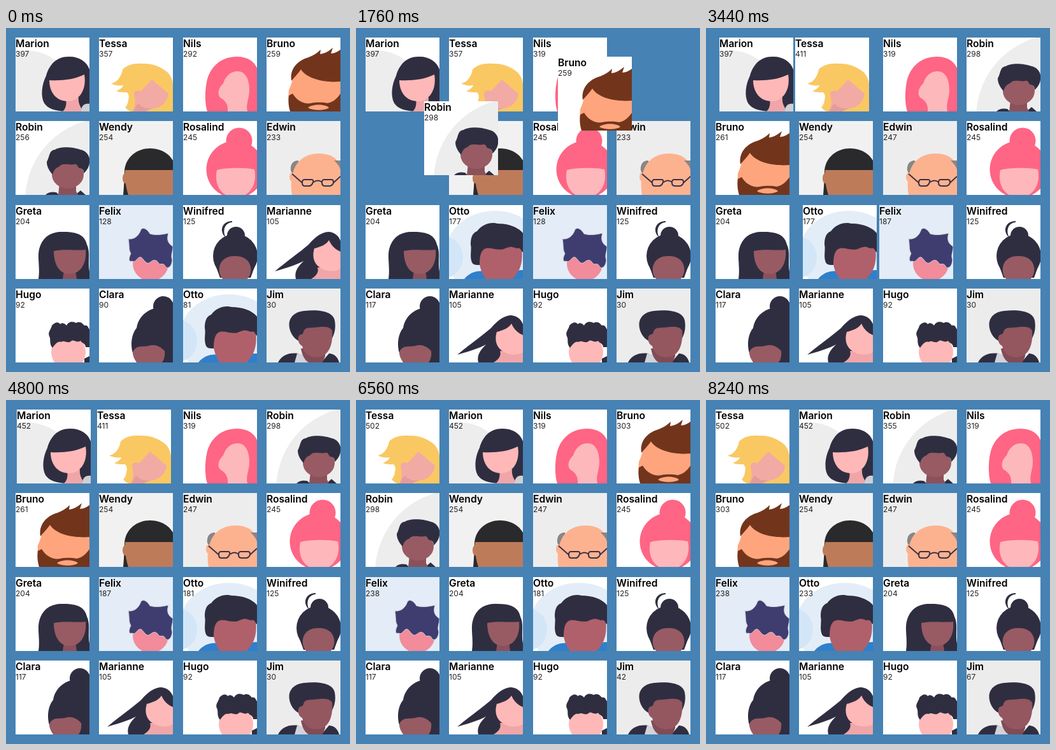
An HTML page that plays this animation: 540x540 px, repeating every 8.32 s.

```html
<!DOCTYPE html>
<html lang="en">
<head>
<meta charset="utf-8">
<title>Leaderboard</title>
<style>
  html, body { margin: 0; width: 100%; height: 100%; overflow: hidden; background: #4682b4; }
  #board { position: absolute; left: 0; top: 0; width: 540px; height: 540px; overflow: hidden; }
  .card { position: absolute; width: 116px; height: 116px; overflow: hidden; background: #fff; }
  .card svg { position: absolute; left: 0; top: 0; }
  .name, .score { position: absolute; left: 0; white-space: nowrap; font-family: Inter, Roboto, sans-serif; }
  .name { top: 0; font-size: 15.6px; line-height: 20px; font-weight: 600; color: #000; }
  .score { top: 19px; font-size: 12px; line-height: 14px; color: #222; }
</style>
</head>
<body>
<div id="board"></div>
<script>
const LOOP = 8320, FRAME = 80, MOVE = 347;
const DARK = '#2f2e41', PINK = '#ff6584', SKIN = '#ffb8b8', BROWN = '#985b63', GREY = '#ededed';

const path = (fill, d, extra = '') => `<path fill="${fill}" d="${d}" ${extra}/>`;
const oval = (fill, x, y, rx, ry = rx) => `<ellipse fill="${fill}" cx="${x}" cy="${y}" rx="${rx}" ry="${ry}"/>`;
const fillAll = fill => path(fill, 'M0 0H116V116H0Z');
const line = (d, w) => path('none', d, `stroke="#3a3047" stroke-width="${w}"`);

// name, starting score, portrait
const people = [
  ['Marion', 397,
    oval(GREY, 15, 100, 80) +
    path(DARK, 'M85 30C65 29 53 42 48 60C41 74 39 92 45 103C51 112 62 115 78 116H116V50C112 38 100 30 85 30Z') +
    path('#f0a6a8', 'M79 94H99C98 104 102 108 106 116H74C80 110 80 104 79 94Z') +
    path('#d0d0d4', 'M116 104C108 103 103 107 103 116H116Z') +
    path(SKIN, 'M53 67C72 68 92 66 108 58C112 82 100 100 82 100C64 100 53 86 53 67Z')],
  ['Tessa', 357,
    path('#fac862', 'M19 72C30 70 35 60 37 50C44 43 55 40 68 41C84 40 98 46 108 55C114 61 116 70 116 74V116H50C44 114 44 112 41 110C44 106 46 102 46 98C48 92 46 88 44 86C38 86 32 86 27 84C34 81 37 78 38 75C32 76 24 75 19 72Z') +
    path('#f2aaa4', 'M83 66L109 88C108 100 98 110 86 111C80 112 76 114 74 116H53C58 106 57 98 55 90C55 84 62 82 66 84Z') +
    path('#e59b98', 'M62 104C70 112 78 112 86 111C80 112 76 114 74 116H53C58 110 58 106 62 104Z') +
    oval('#f4a9a0', 59, 87, 3.5)],
  ['Nils', 292,
    path(PINK, 'M38 116C34 104 34 84 37 70C42 44 62 30 84 30C102 30 112 38 116 48V116Z') +
    path('#fdb8bb', 'M86 53C74 52 66 62 63 72C56 78 53 88 58 94C67 99 71 106 70 116H101C98 104 104 96 104 82C104 66 98 53 86 53Z')],
  ['Bruno', 259,
    path('#ffa57d', 'M42 60L60 44L116 58V116H38C34 104 34 92 35 82C38 76 40 70 42 60Z') +
    path('#72351c', 'M39 68C36 50 48 36 66 31C74 28 80 24 85 19L84 26C92 25 98 21 104 16L101 25C106 25 112 22 116 19V69C94 71 64 66 54 50C50 56 44 62 39 68Z') +
    path('#72351c', 'M41 88C48 100 60 105 70 103C80 101 90 102 96 103C106 101 112 94 116 88V116H37C34 106 34 98 35 91Z') +
    path('#ffa57d', 'M65 110C72 104 92 104 98 110C92 115 72 115 65 110Z')],
  ['Robin', 256,
    oval(GREY, 145, 125, 130) +
    path(DARK, 'M47 116C52 111 58 111 64 112L68 116ZM94 116L102 109L110 116Z') +
    path('#8b515a', 'M69 98H95V110L98 116H67Z') +
    oval(BROWN, 82, 84, 25, 22) +
    path(DARK, 'M49 64C54 56 52 46 62 45C70 39 92 41 102 45C112 47 117 56 116 62C117 70 112 78 107 82C107 76 104 74 101 74C97 74 98 66 92 68C84 70 74 64 68 72C62 74 60 78 58 84C53 78 49 72 49 64Z')],
  ['Wendy', 254,
    fillAll('#f1f1f1') +
    path('#2a2a2c', 'M40 78C42 56 60 43 80 43C96 43 109 50 116 62V116H38C39 104 40 90 40 78Z') +
    oval('#be7b5a', 41, 90, 4, 8) +
    path('#be7b5a', 'M41 77H116V116H46C42 104 40 90 41 77Z')],
  ['Rosalind', 245,
    oval(PINK, 88, 31, 20.5) + oval(PINK, 82, 76, 45.5, 45) +
    path('#feb7bb', 'M53 77C66 73 98 73 112 76C117 100 104 120 82 120C60 120 48 100 53 77Z')],
  ['Edwin', 233,
    fillAll(GREY) +
    path('#8b8585', 'M50 62C40 62 37 70 38 78L42 86H54ZM106 62H116V84H106Z') +
    oval('#fdb28f', 40, 88, 4, 7) +
    path('#fdb28f', 'M40 116C38 106 38 92 41 84C45 62 62 51 82 51C100 51 112 58 116 72V116Z') +
    path('#8b8585', 'M106 62C110 66 114 70 116 76V62Z') +
    line('M40 83L56 97M74 96C78 93 83 93 87 96M105 97L116 87M59 92H71Q74 92 73 96T68 102H60Q56 102 56 97T59 92ZM90 92H102Q105 92 105 96T100 102H92Q87 102 87 97T90 92Z', 2)],
  ['Greta', 204,
    path(DARK, 'M36 116C39 96 33 80 38 66C44 48 58 41 76 42C98 42 109 48 112 62C118 74 113 88 116 104V116Z') +
    path('#8b515a', 'M76 102H94L96 116H74Z') +
    path(BROWN, 'M60 72C76 68 96 72 110 70C112 92 102 108 85 108C68 108 60 92 60 72Z')],
  ['Felix', 128,
    fillAll('#e3ecf7') +
    oval('#f28b9a', 81, 92, 28, 27) +
    path('#3f3d70', 'M46 53C54 54 62 50 66 38C70 34 76 38 80 45C90 48 100 46 109 44C106 54 108 60 116 65C116 74 112 78 115 86C114 98 107 101 104 96C101 90 98 94 94 92C89 83 84 87 80 90C74 95 70 84 66 82C60 80 58 92 52 88C45 90 47 82 50 76C46 70 48 62 46 53Z', 'stroke="#d5d3d8"')],
  ['Winifred', 125,
    path(DARK, 'M77 25C62 25 55 40 67 51C61 39 66 28 77 27Z') +
    oval(DARK, 83, 48, 14) + oval(DARK, 82, 80, 35) +
    path(DARK, 'M50 92L58 114H106L114 92Z') +
    path(BROWN, 'M57 97C60 84 70 80 81 80C93 80 103 84 106 97C108 108 102 116 98 118H64C58 112 56 106 57 97Z')],
  ['Marianne', 105,
    path(DARK, 'M13 104C32 88 52 74 66 62C78 48 88 42 98 42C108 43 114 50 116 56V116H46C43 104 50 96 58 88C42 96 26 100 13 104Z') +
    path('#f0a6a8', 'M80 98H116V116H70C80 110 82 104 80 98Z') +
    path(SKIN, 'M75 68C84 66 94 62 98 55C102 64 108 70 116 73V100C104 107 88 103 80 95C73 88 72 78 75 68Z')],
  ['Hugo', 92,
    path(DARK, 'M108 116V110L116 106V116Z') +
    oval(SKIN, 83, 100, 27) +
    path(DARK, 'M58 93C52 86 56 80 53 75C50 68 56 64 57 58C62 52 68 52 70 56C74 52 78 56 80 58C84 50 92 52 95 54C102 50 106 56 108 58C114 57 114 62 116 64V92H110C110 86 104 86 102 82C96 86 92 80 88 82C82 88 76 80 72 84C66 82 62 88 58 93Z')],
  ['Clara', 90,
    oval(DARK, 101, 28, 16) +
    path(DARK, 'M104 29C80 28 62 42 59 62C50 72 48 94 56 108L60 116H116V33Z') +
    path(BROWN, 'M53 100C58 88 68 92 78 90C88 86 98 92 103 98C104 106 102 112 99 116H59C55 110 53 106 53 100Z')],
  ['Otto', 81,
    oval('#e3edf8', 72, 76, 78, 67) + oval('#d3e6f8', -6, 82, 28, 32) +
    path('#2f7fcb', 'M24 116C32 106 44 102 56 104L116 102V116Z') +
    path('#b0606a', 'M47 66H114C116 84 114 98 106 108L100 116H58C48 104 45 84 47 66Z') +
    path(DARK, 'M36 90C32 80 36 70 34 62C34 52 36 44 44 41C52 30 66 26 76 29C92 29 108 34 116 44V74C112 72 114 66 106 68C98 64 92 66 86 69C76 72 66 66 58 68C50 70 48 80 48 94C42 94 38 94 36 90Z')],
  ['Jim', 30,
    fillAll('#ececec') +
    path(DARK, 'M18 116C24 104 36 100 50 102L62 116ZM86 116L98 102C106 102 112 108 114 116Z') +
    path('#d2d2da', 'M48 102L60 104L68 116H44Z') +
    path('#814c55', 'M54 94H92V106L88 116H66C60 112 56 106 54 94Z') +
    path(DARK, 'M36 62C33 46 44 36 60 35C80 33 104 35 107 50C109 62 107 70 103 78L54 84C44 80 38 72 36 62Z') +
    path('#94565f', 'M50 76C52 70 57 74 58 68C60 60 68 62 76 61C88 60 98 58 103 66C105 90 96 108 78 108C66 108 58 100 56 90C51 88 49 82 50 76Z')]
];

// start time, then who reaches which score
const steps = [
  [-50, {}],
  [295, { Nils: 319 }],
  [641, { Clara: 117 }],
  [988, { Otto: 129 }],
  [1335, { Otto: 177 }],
  [1679, { Robin: 298 }],
  [2028, { Bruno: 261 }],
  [2721, { Edwin: 247 }],
  [3424, { Tessa: 411, Felix: 187 }],
  [4108, { Otto: 181 }],
  [4460, { Marion: 452 }],
  [4801, { Bruno: 303 }],
  [5495, { Felix: 238 }],
  [5841, { Tessa: 457 }],
  [6188, { Jim: 42 }],
  [6535, { Tessa: 502 }],
  [6867, { Robin: 355 }],
  [7228, { Otto: 233 }],
  [7921, { Jim: 67 }]
];

const board = document.getElementById('board');
const cards = people.map(([name, , art]) => {
  const el = document.createElement('div');
  el.className = 'card';
  el.innerHTML = `<svg width="116" height="116" viewBox="0 0 116 116">${art}</svg>` +
    `<div class="name">${name}</div><div class="score"></div>`;
  board.append(el);
  return { name, el, score: el.lastChild };
});

// scores and ranks after every step
const scores = Object.fromEntries(people);
const states = steps.map(([start, gains]) => {
  Object.assign(scores, gains);
  const order = Object.keys(scores).sort((a, b) => scores[b] - scores[a]);
  const rank = Object.fromEntries(order.map((name, i) => [name, i]));
  return { start, rank, scores: { ...scores } };
});

const slot = n => 14.6 + 131.5 * n;
const mix = (a, b, p) => Math.round(a + (b - a) * p) + 'px';

function draw(t) {
  let i = states.length - 1;
  while (states[i].start > t) i--;
  const now = states[i], before = states[Math.max(0, i - 1)];
  const p = Math.min(1, (t - now.start) / MOVE);
  for (const { name, el, score } of cards) {
    const a = before.rank[name], b = now.rank[name];
    el.style.left = mix(slot(a % 4), slot(b % 4), p);
    el.style.top = mix(slot(a >> 2), slot(b >> 2), p);
    el.style.zIndex = b + (a !== b && p < 1 ? 100 : 0);
    score.textContent = now.scores[name];
  }
}

const origin = performance.now();
function tick() {
  const t = (performance.now() - origin) % LOOP;
  draw(Math.floor(t / FRAME) * FRAME);
  requestAnimationFrame(tick);
}
tick();
</script>
</body>
</html>
```
